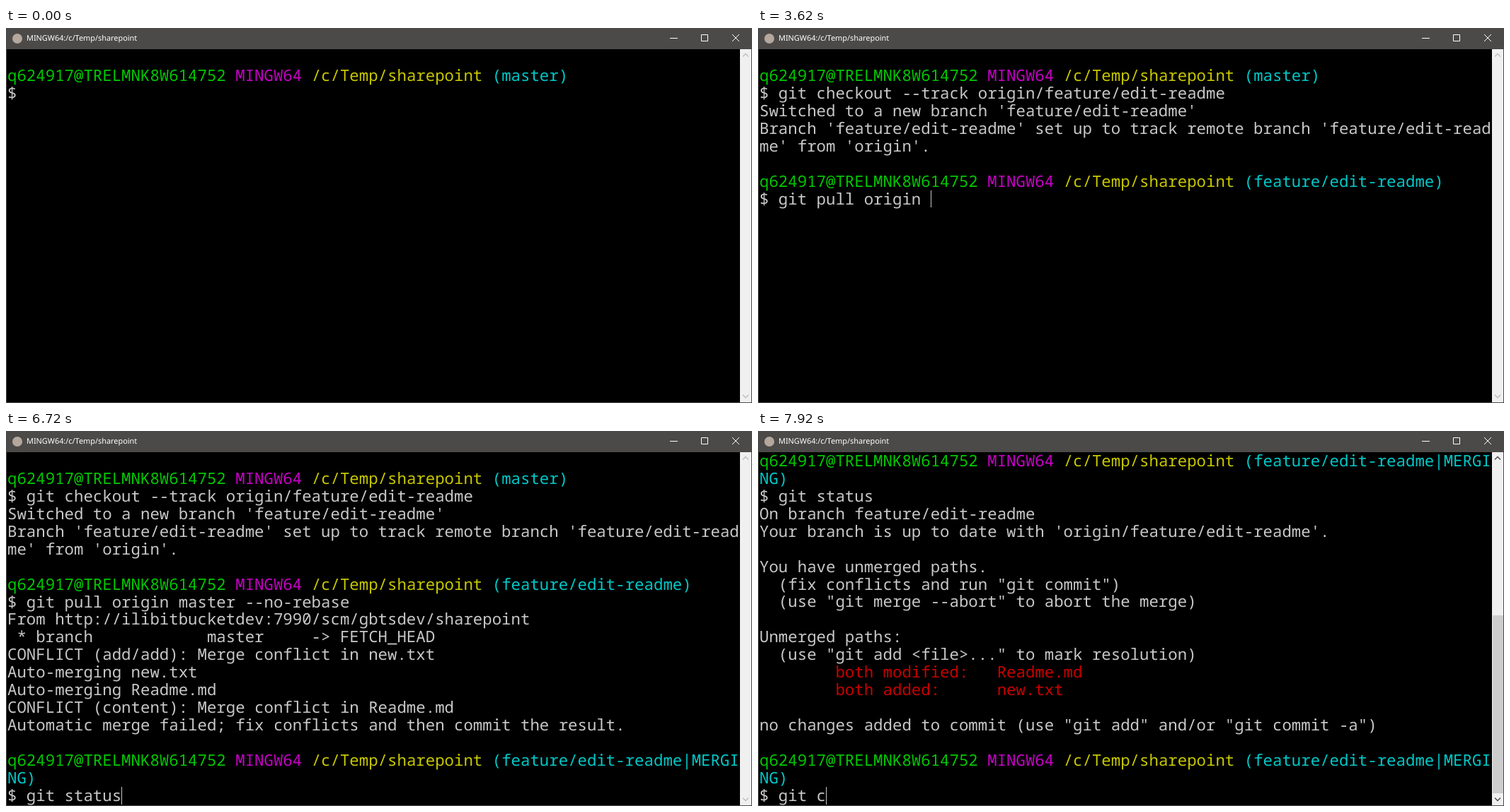
Animation, 1054 px wide and 531 px high, one loop 8000 ms. Source, as an HTML page:

```html
<!DOCTYPE html>
<html lang="en">
<head>
<meta charset="utf-8">
<title>Terminal</title>
<style>
  html, body { margin: 0; width: 100%; height: 100%; overflow: hidden; background: #4c4a48; }
  #window { position: relative; width: 1054px; height: 531px; overflow: hidden; background: #4c4a48; text-rendering: geometricPrecision; }
  #title { position: absolute; left: 29px; top: 0; font: 10.9px/30px "Noto Sans", sans-serif; color: #fff; white-space: pre; }
  #view { position: absolute; left: 1px; top: 30px; width: 1036px; height: 500px; overflow: hidden; background: #000; }
  #text { position: absolute; left: 1px; top: 0; white-space: pre; color: #c8c8c8;
          font: 500 22.383px/24.9375px "Noto Sans Mono", monospace; font-variant-ligatures: none; }
  #text i { display: inline-block; width: 1px; height: 24.9375px; margin-right: -1px; vertical-align: top; background: #c8c8c8; }
  #bar { position: absolute; left: 1037px; top: 30px; width: 16px; height: 500px; background: #f0f0f0; }
  #thumb { position: absolute; left: 1px; width: 15px; background: #cdcdcd; }
  svg { position: absolute; left: 0; top: 0; fill: none; }
  .g { color: #00c800 } .m { color: #c800c8 } .y { color: #c8c800 } .c { color: #00c8c8 } .r { color: #c80000 }
</style>
</head>
<body>
<div id="window">
  <div id="title">MINGW64:/c/Temp/sharepoint</div>
  <div id="view"><div id="text"></div></div>
  <div id="bar"><div id="thumb"></div></div>
  <svg width="1054" height="531">
    <circle cx="16" cy="15" r="7" fill="#b4a79d"/>
    <path d="M938 14.5h11M982.5 9.5h9v9h-9zM1026 9l10 10M1036 9l-10 10" stroke="#fff"/>
    <path id="arrows" d="M1041 40.5l4-4l4 4M1041 519.5l4 4l4-4" stroke-width="1.5"/>
  </svg>
</div>
<script>
const LOOP = 8000, ROWS = 20, PITCH = 24.9375, TRACK_TOP = 16, TRACK = 467;
const $ = id => document.getElementById(id);
const snapshots = [];
let html = '';

// Append output at a given time.
function show(time, added, cursor = true) {
  html += added;
  snapshots.push({ time, html, cursor });
}

// Spread keystrokes evenly over a number of steps.
function type(start, end, steps, keys) {
  const at = i => Math.round(keys.length * i / steps);
  for (let i = 0; i < steps; i++)
    show(start + (end - start) * i / (steps - 1), keys.slice(at(i), at(i + 1)));
}

const span = (cls, s) => `<span class="${cls}">${s}</span>`;
const prompt = branch => '\n' + [span('g', 'q624917@TRELMNK8W614752'), span('m', 'MINGW64'),
  span('y', '/c/Temp/sharepoint'), span('c', `(${branch})`)].join(' ') + '\n$ ';
const merging = prompt('feature/edit-readme|MERGI\nNG');

show(0, prompt('master'), false);
type(70, 870, 13, 'git checkout --track ');
type(990, 1743, 17, 'origin/feature/edit-readme');
show(1790, '\n');
show(1870, "Switched to a new branch 'feature/edit-readme'\n");
show(1910, "Branch 'feature/edit-readme' set up to track remote branch 'feature/edit-read\nme' from 'origin'.\n");

show(2130, prompt('feature/edit-readme'), false);
show(2340, '');
type(2550, 3300, 8, 'git pull o');
type(3410, 3620, 3, 'rigin ');
type(3830, 4260, 5, 'master --');
type(4470, 5000, 6, 'no-rebase');
show(5110, '\n');
show(5330, `From http://ilibitbucketdev:7990/scm/gbtsdev/sharepoint
 * branch            master     -&gt; FETCH_HEAD
`);
show(5550, `CONFLICT (add/add): Merge conflict in new.txt
Auto-merging new.txt
Auto-merging Readme.md
CONFLICT (content): Merge conflict in Readme.md
Automatic merge failed; fix conflicts and then commit the result.
`);

show(5770, merging, false);
show(5870, '');
show(5980, '', false);
show(6190, '');
type(6400, 6720, 4, 'git status');
show(6830, '\n');
show(7040, `On branch feature/edit-readme
Your branch is up to date with 'origin/feature/edit-readme'.

You have unmerged paths.
  (fix conflicts and run "git commit")
  (use "git merge --abort" to abort the merge)

Unmerged paths:
  (use "git add &lt;file&gt;..." to mark resolution)
`);
show(7150, `        ${span('r', 'both modified:   Readme.md')}
        ${span('r', 'both added:      new.txt')}

no changes added to commit (use "git add" and/or "git commit -a")
`);

show(7260, merging, false);
show(7380, '');
show(7590, '', false);
type(7810, 7920, 2, 'git c');

let current;
function draw() {
  const t = performance.now() % LOOP;
  const snap = snapshots.findLast(s => s.time <= t);
  if (snap !== current) {
    current = snap;
    const lines = snap.html.split('\n').length;
    const scroll = Math.max(0, lines - ROWS);
    $('text').innerHTML = snap.html + `<i style="visibility:${snap.cursor ? 'visible' : 'hidden'}"></i>`;
    $('text').style.transform = `translateY(${-scroll * PITCH}px)`;
    $('thumb').style.top = TRACK_TOP + TRACK * scroll / lines + 'px';
    $('thumb').style.height = (scroll ? TRACK * ROWS / lines : 0) + 'px';
    $('arrows').setAttribute('stroke', scroll ? '#505050' : '#bfbfbf');
  }
  requestAnimationFrame(draw);
}
draw();
</script>
</body>
</html>
```
